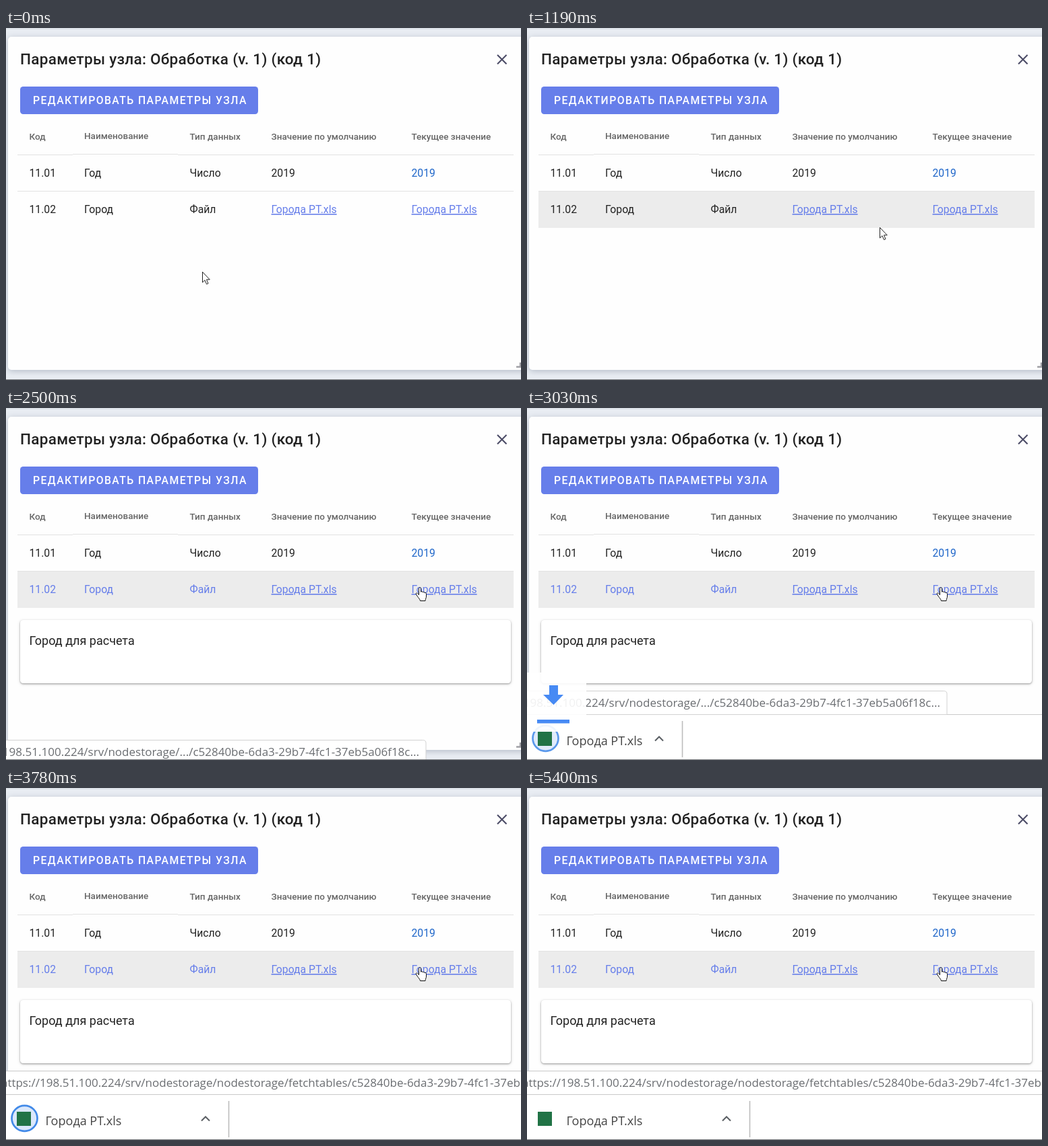
These frames come from a looping animation (764x523 px, 6.31 s). An HTML page:

```html
<!DOCTYPE html>
<html lang="ru">
<head>
<meta charset="utf-8">
<title>Параметры узла</title>
<style>
html, body { margin: 0; width: 100%; height: 100%; overflow: hidden; background: #e9edf3; }
svg { display: block; width: 764px; height: 523px; }
text { font-family: Roboto, Arial, sans-serif; font-size: 15.75px; fill: #222; white-space: pre; }
.title { font-size: 22.5px; font-weight: 500; letter-spacing: .0125em; }
.btn { font-weight: 500; letter-spacing: .0893em; fill: #fff; }
.head { font-size: 13.5px; font-weight: 500; fill: #666; }
.note { font-size: 18px; }
.blue { fill: #1f66c9; }
.link { fill: #667eea; text-decoration: underline; }
.on text { fill: #667eea; }
.url { font: 17px "Open Sans", "Noto Sans", sans-serif; fill: #6a6d71; }
.file { font: 18px "Open Sans", "Noto Sans", sans-serif; fill: #444; }
.panel { filter: drop-shadow(0 2px 5px rgba(70, 85, 110, .32)); }
.card { filter: drop-shadow(0 1px 1px rgba(0, 0, 0, .3)) drop-shadow(0 1px 2px rgba(0, 0, 0, .16)); }
</style>
</head>
<body>
<svg viewBox="0 0 764 523">
  <defs>
    <clipPath id="itemClip"><rect id="itemBox" x="0" y="456" width="330" height="67"/></clipPath>
  </defs>

  <rect width="764" height="523" fill="#e9edf3"/>
  <rect width="764" height="2" fill="#dce1e8"/>
  <rect class="panel" x="3" y="13" width="775" height="495" rx="5" fill="#fefefe"/>
  <path d="M757 503.5H763V497" fill="none" stroke="#a0a0a5" stroke-width="2.4"/>

  <text class="title" x="21" y="54">Параметры узла: Обработка (v. 1) (код 1)</text>
  <path d="M729 40L742.5 53.5M742.5 40L729 53.5" stroke="#4b4b66" stroke-width="2.1"/>
  <rect x="21" y="87" width="353" height="41" rx="4.5" fill="#667eea"/>
  <text class="btn" x="40" y="113">РЕДАКТИРОВАТЬ ПАРАМЕТРЫ УЗЛА</text>

  <rect id="hover" x="17" y="243" width="736" height="54" fill="#ececec"/>
  <path d="M17 188.5H99M99 187.5H255M255 188.5H753M17 242.5H753" stroke="#e2e2e2"/>
  <g id="table"></g>

  <g id="note">
    <rect class="card" x="21" y="315" width="728" height="94" rx="4.5" fill="#fff"/>
    <text class="note" x="34.5" y="352">Город для расчета</text>
  </g>

  <g id="lower">
    <g id="shelf">
      <rect y="455" width="764" height="75" fill="#fff"/>
      <path d="M0 455.5H764" stroke="#c9c9c9"/>
      <g clip-path="url(#itemClip)">
        <g id="ring">
          <circle cx="27.5" cy="490.8" r="19" fill="#d8e6fb" stroke="#2f7ee6" stroke-width="2.7"/>
        </g>
        <rect x="16" y="481" width="21" height="21" fill="#217346"/>
        <text class="file" x="58.5" y="501">Города РТ.xls</text>
      </g>
      <g id="itemEnd">
        <path d="M-40 494.5L-34 488.5L-28 494.5" fill="none" stroke="#5a5e63" stroke-width="2"/>
        <path d="M.5 465V519" stroke="#bdbdbd" stroke-width="1.6"/>
      </g>
    </g>
    <g id="shortUrl">
      <path d="M-2 420.5H618.5Q623 420.5 623 425V455.5H-2Z" fill="#fff" stroke="#d2d2d2"/>
      <text class="url" x="613" y="444" text-anchor="end">198.51.100.224/srv/nodestorage/.../c52840be-6da3-29b7-4fc1-37eb5a06f18c...</text>
    </g>
    <g id="longUrl">
      <path d="M-2 420.5H766V455.5H-2Z" fill="#fff" stroke="#c9c9c9"/>
      <text class="url" x="-8" y="444">https://198.51.100.224/srv/nodestorage/nodestorage/fetchtables/c52840be-6da3-29b7-4fc1-37eb5a06</text>
    </g>
  </g>

  <g id="drop">
    <rect width="88" height="88" fill="#fff" opacity=".9"/>
    <path d="M33 19H46V33H54L39.5 48L24 33H33ZM15 70H63V75.5H15Z" fill="#478af4"/>
  </g>

  <path d="M0 522.5H764" stroke="#707276"/>

  <path id="arrow" d="M.5 .5V16L4 12.7L6.6 18.6L9 17.5L6.5 11.8H11.3Z" fill="#fff" stroke="#222"/>
  <path id="hand" transform="translate(607 266)" fill="#fff" stroke="#111" stroke-linejoin="round"
    d="M5.5 2.3C5.5 .2 8.5 .2 8.5 2.3V7.2C9.2 6.3 11.2 6.5 11.4 7.8C12.2 7 13.8 7.3 14 8.6C15.2 8 16.5 8.8 16.5 10.2V14C16.5 16.5 15 17.5 15 20.5H7.5C7.2 17.8 4.5 16 3.4 13.8L1.4 10.8C.5 9 2.5 8.2 3.6 9.4L5.5 11.5Z"/>
</svg>
<script>
const LOOP = 6310;
const STEPS = [620, 770, 910, 1060, 1190, 1340, 1470, 1620, 1770, 1920, 2500, 2760, 2900, 3030,
  3180, 3330, 3480, 3630, 3780, 3910, 4060, 4220, 4370, 4520, 4670, 4820, 5100, 5250, 5400];
const COLS = [34.5, 116, 272.5, 393.5, 601.5];
const HEADS = ['Код', 'Наименование', 'Тип данных', 'Значение по умолчанию', 'Текущее значение'];
const FILE = 'Города РТ.xls';

const $ = id => document.getElementById(id);
const clamp = v => Math.max(0, Math.min(1, v));
const span = (t, from, length) => clamp((t - from) / length);
const show = (id, on) => $(id).setAttribute('visibility', on ? 'visible' : 'hidden');
const move = (id, x, y) => $(id).setAttribute('transform', `translate(${x} ${y})`);
const fade = (id, v) => $(id).setAttribute('opacity', v);

function row(id, y, cells, classOf) {
  const texts = cells.map((s, i) =>
    `<text class="${classOf(i)}" x="${COLS[i]}" y="${y(i)}">${s}</text>`);
  return `<g id="${id}">${texts.join('')}</g>`;
}

$('table').innerHTML =
  row('heads', i => i === 1 ? 165 : 166, HEADS, () => 'head') +
  row('year', () => 221, ['11.01', 'Год', 'Число', '2019', '2019'], i => i === 4 ? 'blue' : '') +
  row('city', () => 275, ['11.02', 'Город', 'Файл', FILE, FILE], i => i > 2 ? 'link' : '');

function draw(time) {
  const t = STEPS.reduce((held, s) => s <= time ? s : held, 0);

  // pointer
  const p = t < 620 ? 0 : span(t, 360, 1260);
  const e = p * p * (3 - 2 * p);
  const y = 362 - 80 * e ** 0.63;
  move('arrow', Math.round(291 + 318 * e), Math.round(y));
  show('arrow', t < 1770);
  show('hand', t >= 1770);
  show('hover', y < 297);

  // selected row
  const picked = t >= 2500;
  $('city').setAttribute('class', picked ? 'on' : '');
  show('note', picked);

  // status line and download shelf
  move('lower', 0, 73 * (1 - span(t, 2670, 120)));
  show('shortUrl', t >= 1920 && t < 3480);
  show('longUrl', t >= 3480);
  show('shelf', t >= 2760);
  const width = Math.round(330 * (1 - (1 - span(t, 2670, 800)) ** 2));
  $('itemBox').setAttribute('width', width);
  move('itemEnd', width, 0);

  // completion pulse: two and a half cycles
  const pulse = span(t, 2880, 2500);
  fade('ring', 0.5 + 0.5 * Math.cos(pulse * 5 * Math.PI));

  // falling arrow
  const d = span(t, 2730, 600);
  move('drop', 0, 349 + 88 * d);
  fade('drop', Math.sin(Math.PI * d));
  show('drop', d > 0 && d < 1);
}

const start = performance.now();
function tick() {
  draw((performance.now() - start) % LOOP);
  requestAnimationFrame(tick);
}
tick();
</script>
</body>
</html>
```
